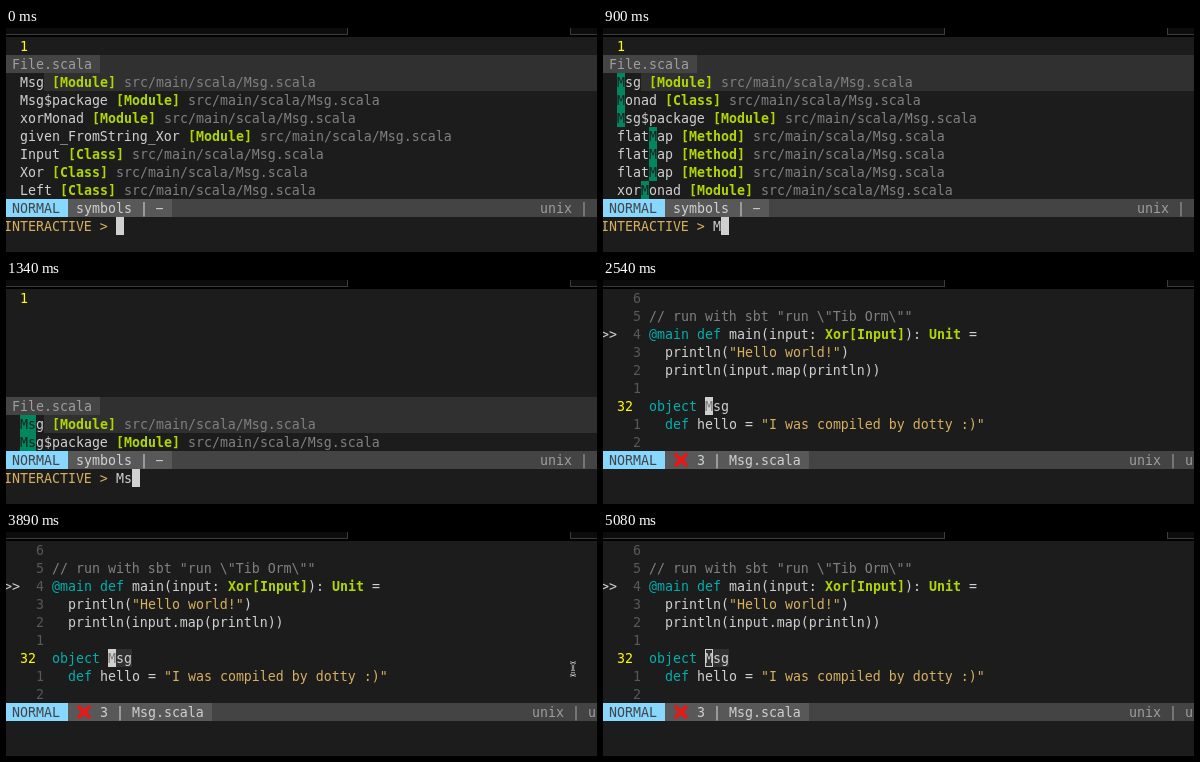
An HTML page with a canvas for the animation above (5.18 s loop, 591 by 224 pixels).

```html
<!DOCTYPE html>
<html lang="en">
<head>
<meta charset="utf-8">
<title>Symbol search</title>
<style>
html, body { margin: 0; width: 100%; height: 100%; overflow: hidden; background: #000; }
canvas { display: block; width: 591px; height: 224px; }
</style>
</head>
<body>
<canvas id="stage" width="591" height="224"></canvas>
<script>
const ctx = document.getElementById('stage').getContext('2d');
const W = 591, H = 224, LOOP = 5180;
const CELL = 8, LINE = 18, LEFT = -2, TOP = 9;
const FONT = '13.288px "DejaVu Sans Mono", monospace';
const C = {
  bg: '#1c1c1c', fg: '#d0d0d0', dim: '#808080', number: '#585858', yellow: '#ffff00',
  type: '#afd700', keyword: '#00afaf', string: '#d7af5f', match: '#00875f',
  line: '#303030', bar: '#444444', barMid: '#585858', barText: '#9e9e9e', mode: '#87d7ff'
};

const colX = col => LEFT + col * CELL;
const rowY = row => TOP + row * LINE;

function rect(x, y, w, h, color) {
  ctx.fillStyle = color;
  ctx.fillRect(x, y, w, h);
}

function cells(col, row, count, color) {
  rect(colX(col), rowY(row), count * CELL, LINE, color);
}

// Writes a run on the character grid and returns the next free column.
function write(col, row, text, color = C.fg, bold = false) {
  ctx.font = (bold ? 'bold ' : '') + FONT;
  ctx.fillStyle = color;
  ctx.fillText(text, colX(col), rowY(row) + 14);
  return col + text.length;
}

function runs(col, row, parts) {
  for (const [text, color, bold] of parts) col = write(col, row, text, color, bold);
}

function background() {
  rect(0, 0, W, H, '#000');
  rect(0, 0, 342, 7, '#3c3c3c');
  rect(0, 0, 341, 6, '#0c0c0c');
  rect(564, 0, 27, 7, '#3c3c3c');
  rect(565, 0, 26, 6, '#0c0c0c');
  rect(0, TOP, W, H - TOP, C.bg);
}

function statusLine(midEnd, rightCol) {
  rect(0, rowY(9), W, LINE, C.bar);
  rect(62, rowY(9), midEnd - 62, LINE, C.barMid);
  rect(0, rowY(9), 62, LINE, C.mode);
  write(1, 9, 'NORMAL', C.bar);
  write(rightCol, 9, 'unix | u', C.barText);
}

const item = (name, kind = 'Module') => ({ name, kind });
const LISTS = {
  '': [item('Msg'), item('Msg$package'), item('xorMonad'), item('given_FromString_Xor'),
    item('Input', 'Class'), item('Xor', 'Class'), item('Left', 'Class')],
  'M': [item('Msg'), item('Monad', 'Class'), item('Msg$package'), item('flatMap', 'Method'),
    item('flatMap', 'Method'), item('flatMap', 'Method'), item('xorMonad')],
  'Ms': [item('Msg'), item('Msg$package')]
};

function listItem({ name, kind }, row, query) {
  const col = 2;
  const col2 = write(col, row, name) + 1;
  if (query) {
    const at = col + name.indexOf(query);
    cells(at, row, query.length, C.match);
    write(at, row, query, C.bg);
  }
  const col3 = write(col2, row, `[${kind}]`, C.type, true) + 1;
  write(col3, row, 'src/main/scala/Msg.scala', C.dim);
}

function searchView(typed, query) {
  const items = LISTS[query];
  const first = 9 - items.length;
  write(2, 0, '1', C.yellow);

  rect(0, rowY(first - 1), W, LINE, C.line);
  rect(0, rowY(first - 1), 94, LINE, C.bar);
  write(1, first - 1, 'File.scala', C.barText);

  rect(38, rowY(first), W - 38, LINE, C.line);
  items.forEach((it, i) => listItem(it, first + i, query));

  statusLine(166, 67);
  write(9, 9, 'symbols | \u2212');
  write(0, 10, 'INTERACTIVE >', C.string);
  cells(write(14, 10, typed), 10, 1, C.fg);
}

const CODE = [
  [],
  [['// run with sbt "run \\"Tib Orm\\""', C.dim]],
  [['@main def', C.keyword], [' main(input: '], ['Xor[Input]', C.type, true], ['): '],
    ['Unit', C.type, true], [' =']],
  [['  println('], ['"Hello world!"', C.string], [')']],
  [['  println(input.map(println))']],
  [],
  [['object', C.keyword], [' Msg']],
  [['  def', C.keyword], [' hello = '], ['"I was compiled by dotty :)"', C.string]],
  []
];
const CURRENT = 6;

function cross(x, y, r) {
  ctx.strokeStyle = '#f01414';
  ctx.lineWidth = 3.6;
  ctx.beginPath();
  ctx.moveTo(x - r, y - r);
  ctx.lineTo(x + r, y + r);
  ctx.moveTo(x + r, y - r);
  ctx.lineTo(x - r, y + r);
  ctx.stroke();
}

function blockCursor(col, row, hollow) {
  const x = colX(col), y = rowY(row);
  rect(x, y, CELL, LINE, C.fg);
  if (hollow) rect(x + 1, y + 1, CELL - 2, LINE - 2, C.line);
  write(col, row, 'M', hollow ? C.fg : '#777');
}

function editorView(highlight, hollow) {
  if (highlight) cells(13, CURRENT, 3, C.line);
  CODE.forEach((parts, row) => {
    const current = row === CURRENT;
    if (current) write(2, row, '32', C.yellow);
    else write(4, row, String(Math.abs(row - CURRENT)), C.number);
    runs(6, row, parts);
  });
  write(0, 2, '>>');
  blockCursor(13, CURRENT, hollow);
  statusLine(206, 66);
  cross(78, 180, 6);
  write(12, 9, '3 | Msg.scala');
}

function pointer(x, y) {
  const p = new Path2D();
  const side = (dir, top, bottom) => {
    p.moveTo(x + 4 + dir * 3, y + top);
    p.quadraticCurveTo(x + 4, y + top, x + 4, y + bottom);
  };
  for (const dir of [-1, 1]) {
    side(dir, 1.5, 4);
    side(dir, 14.5, 12);
  }
  p.moveTo(x + 4, y + 3);
  p.lineTo(x + 4, y + 13);
  p.moveTo(x + 2, y + 10.5);
  p.lineTo(x + 6, y + 10.5);
  for (const [color, width] of [['#e6e6e6', 2.2], ['#111', 0.9]]) {
    ctx.strokeStyle = color;
    ctx.lineWidth = width;
    ctx.stroke(p);
  }
}

const POINTER = [
  { at: 3890, x: 563, y: 129 },
  { at: 4040, x: 574, y: 167 },
  { at: 4190, x: 567, y: 196 },
  { at: 4340, x: 572, y: 205 }
];

function draw(t) {
  background();
  if (t < 2540) {
    const typed = t < 750 ? '' : t < 1190 ? 'M' : 'Ms';
    const query = t < 900 ? '' : t < 1340 ? 'M' : 'Ms';
    searchView(typed, query);
    return;
  }
  editorView(t >= 3140, t >= 5080);
  const spot = POINTER.filter(p => p.at <= t).pop();
  if (spot && t < 4480) pointer(spot.x, spot.y);
}

const start = performance.now();
function tick() {
  draw((performance.now() - start) % LOOP);
  requestAnimationFrame(tick);
}
tick();
</script>
</body>
</html>
```
